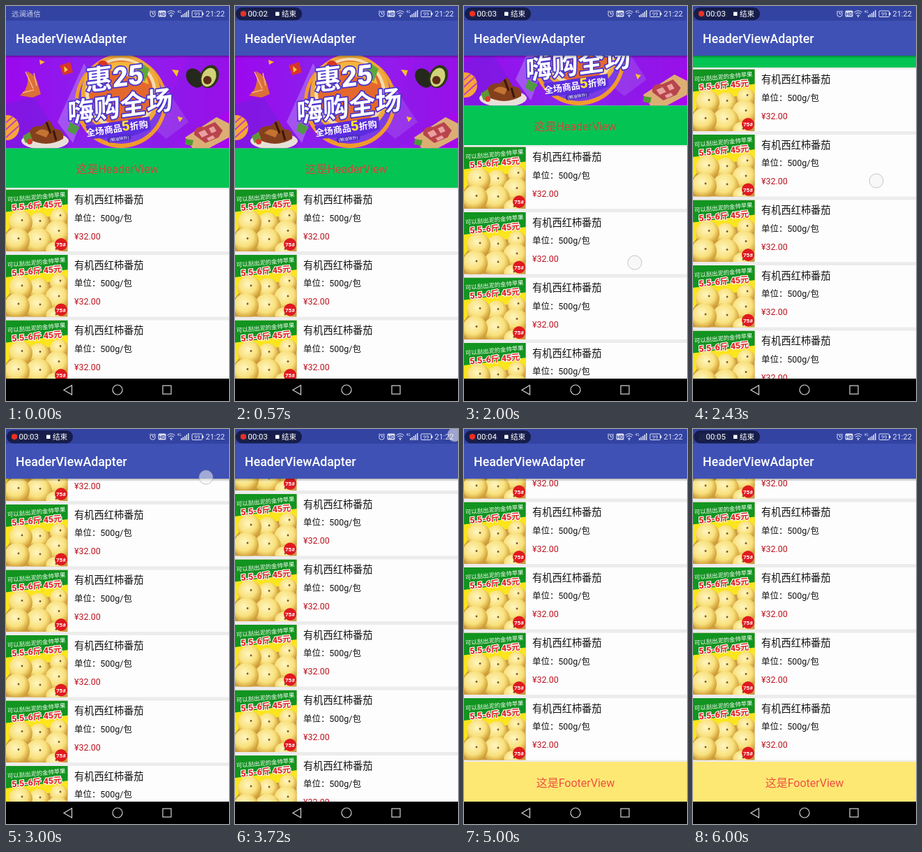
An HTML page that plays this animation: 320 by 565 pixels, repeating every 6.14 s.

```html
<!DOCTYPE html>
<html lang="zh-CN">
<head>
<meta charset="utf-8">
<title>HeaderViewAdapter</title>
<style>
html, body { margin: 0; width: 100%; height: 100%; overflow: hidden; background: #000; }
svg { display: block; width: 100%; height: 100%; font-family: Roboto, "Noto Sans CJK SC", "Noto Sans CJK", sans-serif; }
.mid { text-anchor: middle; }
.promo { text-anchor: middle; font-weight: 800; fill: #fff; stroke: #4a34cc; stroke-width: 3.5; stroke-linejoin: round; paint-order: stroke; }
.line { fill: none; stroke: #d4d4d4; stroke-width: 1.2; }
.thin { fill: none; stroke: #dfe3f5; stroke-width: 1; }
</style>
</head>
<body>
<svg viewBox="0 0 320 565" lang="zh-CN">
  <defs>
    <clipPath id="view"><rect y="71" width="320" height="462"/></clipPath>
    <clipPath id="bannerBox"><rect y="71" width="320" height="132.5"/></clipPath>
    <clipPath id="photoBox"><rect width="88.5" height="88.5"/></clipPath>
    <linearGradient id="violet">
      <stop offset="0" stop-color="#9c08ee"/><stop offset=".5" stop-color="#8428ec"/><stop offset="1" stop-color="#a806ee"/>
    </linearGradient>
    <linearGradient id="shade" x2="0" y2="1">
      <stop offset="0" stop-color="#000" stop-opacity=".3"/><stop offset="1" stop-color="#000" stop-opacity="0"/>
    </linearGradient>
    <radialGradient id="apple" cx=".42" cy=".36" r=".62">
      <stop offset="0" stop-color="#fff6c0"/><stop offset=".6" stop-color="#f8e07c"/><stop offset="1" stop-color="#cf9c34"/>
    </radialGradient>
    <g id="photo" clip-path="url(#photoBox)">
      <rect width="89" height="89" fill="#c99a45"/>
      <path d="M0 28L89 16V36L50 40 12 46 0 62Z" fill="#fbe51c"/>
      <g id="apples" fill="url(#apple)"></g>
      <path d="M0 0H89V21L0 32Z" fill="#129420"/>
      <circle cx="79" cy="78.500" r="9" fill="#e01a20"/>
    </g>
  </defs>

  <rect width="320" height="565" fill="#ececec"/>
  <g clip-path="url(#view)">
    <g id="list">
      <g clip-path="url(#bannerBox)">
        <rect y="71" width="320" height="133" fill="url(#violet)"/>
        <path d="M0 140L40 130 90 204H0Z" fill="#7a1ce0" opacity=".7"/>
        <path d="M74 166L112 82 128 110 96 196ZM212 90L262 166 230 190 206 170Z" fill="#b98cf4" opacity=".5"/>
        <path d="M262 71H320V150L232 204H205Z" fill="#8a1ae6" opacity=".5"/>
        <circle cx="165" cy="137" r="66" fill="#f29a2c"/>
        <circle cx="165" cy="136" r="61" fill="#7a3ce4"/>
        <circle cx="165" cy="126" r="57" fill="#f0a83c"/>
        <circle cx="165" cy="125" r="51" fill="#f4dcae"/>
        <circle cx="165" cy="124" r="46" fill="#e4682c"/>
        <path d="M125 100Q150 68 196 86L205 112 150 92Z" fill="#f5b53c"/>
        <path d="M192 80l14 10-7 18-12-12z" fill="#5fa83a"/>
        <circle cx="139" cy="86" r="8" fill="#d63524"/>
        <path d="M114 172L206 158 208 176 182 186 122 190Z" fill="#5c2ce0"/>
        <path d="M92 166l14 8-8 10-10-6zM222 146l14-4-4 12z" fill="#4f9a42"/>

        <path d="M30 93Q44 100 46 112L50 126 38 131 20 128 27 121Q34 108 30 93Z" fill="#dc7038"/>
        <path d="M28 94L39 118M40 96L44 114M24 124L40 120" fill="none" stroke="#f6b488" stroke-width="1.500"/>
        <path d="M77 85l15-5 4 15-14 4z" fill="#d8342c"/>
        <path d="M83 86l6 5-5 4z" fill="#f8ca3c"/>
        <path d="M48 77l8 3-7 4z" fill="#f5b92c"/>
        <circle cx="1" cy="174" r="18" fill="#f4a63a"/>
        <path d="M-6 172L10 158M-6 182L16 162M0 188L19 171" stroke="#c23fc0" stroke-width="2"/>
        <ellipse cx="56" cy="193" rx="34" ry="12" fill="#e8e0d8"/>
        <path d="M32 190Q32 170 50 172L62 163 70 176Q84 176 82 190 58 204 32 190Z" fill="#84401c"/>
        <path d="M42 182Q50 172 62 180L58 188Z" fill="#c47432"/>
        <path d="M68 178L72 192M58 166L64 182" stroke="#38180c" stroke-width="3"/>
        <path d="M24 186l10-6 4 12-10 4z" fill="#5f9638"/>
        <circle cx="34" cy="194" r="4" fill="#d83c2c"/>

        <ellipse cx="271" cy="103" rx="11" ry="15" transform="rotate(-38 271 103)" fill="#25281c"/>
        <ellipse cx="292" cy="101" rx="13" ry="17" transform="rotate(22 292 101)" fill="#2c3818"/>
        <ellipse cx="291" cy="102" rx="10" ry="14" transform="rotate(22 291 102)" fill="#d2d278"/>
        <circle cx="289" cy="106" r="6" fill="#5c2e18"/>
        <path d="M257 188L302 159 320 168V188L290 204H268Z" fill="#dcae74"/>
        <path d="M270 184Q270 171 284 173L300 166 311 178 305 188 286 196Z" fill="#b8444c"/>
        <path d="M276 181l9-4 5 7-9 4zM291 175l7-3 4 7-7 3zM288 189l9-4 3 4-9 4z" fill="#eaa0a0"/>
        <path d="M258 190l11 2-2 8-10-2z" fill="#4f9a35"/>
        <path d="M238 91l10 1-3 9zM246 158l8 2-5 6z" fill="#f5c42c"/>

        <text class="promo" font-size="39" transform="translate(156 116) rotate(-7) skewX(-6)">惠25</text>
        <text class="promo" font-size="38" transform="translate(164 157) rotate(-7.500) skewX(-6)">嗨购全场</text>
        <g transform="translate(160 180) rotate(-8.500)">
          <text class="mid" font-size="13" font-weight="700" fill="#fff">全场商品<tspan font-size="20" font-weight="900" fill="#ffe22c">5</tspan>折购</text>
          <rect x="-16" y="6" width="34" height="8" rx="4" fill="#4a28c0"/>
          <text class="mid" x="1" y="12.300" font-size="6" fill="#fff">(粮油除外)</text>
        </g>
      </g>
      <rect y="203.500" width="320" height="56.500" fill="#04c454"/>
      <text class="mid" x="159.500" y="238.500" font-size="16" fill="#d0483c">这是HeaderView</text>
      <g id="rows"></g>
      <rect y="1195" width="320" height="58" fill="#fde874"/>
      <text class="mid" x="160" y="1230.500" font-size="16" fill="#ee5040">这是FooterView</text>
    </g>
    <ellipse id="glow" cx="160" cy="533" rx="420" ry="28" fill="#3f51b5"/>
    <rect y="71" width="320" height="4" fill="url(#shade)"/>
  </g>

  <rect width="320" height="21" fill="#3343a2"/>
  <rect y="21" width="320" height="50" fill="#3f51b5"/>
  <text x="14" y="53" font-size="17.780" font-weight="500" fill="#fff">HeaderViewAdapter</text>

  <g fill="#dfe3f5">
    <text x="8" y="14.800" font-size="10.400" fill="#c2c9ea">远澜通信</text>
    <g class="thin"><circle cx="210.500" cy="11.500" r="3.800"/><path d="M210.500 9V11.500H212.500M206 8.500L208 6.500M215 8.500L213 6.500"/></g>
    <rect x="218.500" y="6.500" width="11" height="9" rx="1.500"/>
    <text class="mid" x="224" y="13.700" font-size="7" font-weight="700" fill="#3343a2">HD</text>
    <path class="thin" d="M231.500 9Q237 4.500 242.500 9M233 11.500Q237 8 241 11.500M235 13.700Q237 12 239 13.700"/>
    <circle cx="237" cy="15" r="1"/>
    <text x="245.500" y="9.500" font-size="5">4G</text>
    <path d="M251 13h1.500v3H251zM253.500 11.500h1.500v4.500h-1.500zM256 10h1.500v6H256zM258.500 8h1.500v8h-1.500zM261 6h1.500v10H261z"/>
    <rect class="thin" x="267" y="7" width="14.500" height="8.500" rx="1"/>
    <rect x="282" y="9.500" width="1.500" height="3.500"/>
    <text class="mid" x="274.300" y="14" font-size="7.500">99</text>
    <text x="286.500" y="15" font-size="11">21:22</text>
  </g>

  <g id="badge" fill="#fff">
    <rect x="1" y="2" width="95" height="18.500" rx="9" fill="#12183c" opacity=".86"/>
    <path id="dot" d="M12 6.500l4 2.200v4.600l-4 2.200-4-2.200V8.700z" fill="#ee3024"/>
    <text id="clock" x="18.500" y="15" font-size="11.400"></text>
    <rect x="58" y="8.500" width="5.500" height="5.500"/>
    <text x="67" y="15" font-size="10.600">结束</text>
  </g>

  <rect y="533" width="320" height="32" fill="#000"/>
  <path class="line" d="M94.500 542.500V556L83 549.200Z"/>
  <circle class="line" cx="160" cy="549" r="7"/>
  <rect class="line" x="225" y="543" width="12" height="12"/>

  <circle id="touch" r="10" fill="#f4f4f4" fill-opacity=".55" stroke="#999" stroke-opacity=".55"/>
</svg>
<script>
const LOOP = 6140, ROWS = 10, PITCH = 93.5;
const $ = id => document.getElementById(id);

// Apples: x, y, radius
$('apples').innerHTML = [[76, 40, 13], [47, 48, 15], [21, 47, 17], [74, 62, 18],
  [47, 74, 19], [16, 73, 18], [70, 88, 13]].map(([x, y, r]) =>
  `<circle cx="${x}" cy="${y}" r="${r}"/><circle cx="${x + 2}" cy="${y - 3}" r="1.4" fill="#7d5a2c"/>`).join('');

const row = y => `<g transform="translate(0 ${y})">
  <rect width="320" height="88.5" fill="#fdfdfd"/>
  <use href="#photo"/>
  <g class="mid" transform="rotate(-5 44 20)">
    <text x="44.500" y="13.800" font-size="8.400" font-weight="500" fill="#fff">可以刮出泥的金帅苹果</text>
    <text x="44" y="27.300" font-size="12.200" font-weight="800" fill="#e0201c" stroke="#fff" stroke-width="2.200" paint-order="stroke">5.5-6斤 45元</text>
  </g>
  <text class="mid" x="79" y="81.500" font-size="8" font-weight="700" fill="#fff">75#</text>
  <text x="98" y="19.500" font-size="14.220" fill="#111">有机西红柿番茄</text>
  <text x="98" y="45.300" font-size="12.440" fill="#111">单位：500g/包</text>
  <text x="98" y="71" font-size="12.440" fill="#bb1420">¥32.00</text>
</g>`;
$('rows').innerHTML = Array.from({length: ROWS}, (_, i) => row(262.5 + i * PITCH)).join('');

// Tracks of [tick, value]
const scroll = [[11, 0], [12, 14], [14, 61], [17, 172], [21, 341.5], [24, 398], [26, 450], [28, 612], [29.5, 719]];
const touchX = [[10, 240], [14, 245], [21, 287], [26, 315]];
const touchY = [[10, 434], [11, 430], [14, 367], [17, 250], [21, 69], [26, 8]];
const glow = [[28, 0], [30, 28], [31, 25], [34, 0]];

function at(track, k) {
  if (k <= track[0][0]) return track[0][1];
  for (let i = 1; i < track.length; i++) {
    const [a, u] = track[i - 1], [b, v] = track[i];
    if (k <= b) return u + (v - u) * (k - a) / (b - a);
  }
  return track[track.length - 1][1];
}

const show = (id, on) => $(id).style.display = on ? '' : 'none';

function draw() {
  const k = Math.floor(Math.floor(performance.now() % LOOP / 10) * 7 / 100);
  $('list').setAttribute('transform', `translate(0 ${-at(scroll, k)})`);

  show('touch', k >= 10 && k <= 26);
  $('touch').setAttribute('cx', at(touchX, k));
  $('touch').setAttribute('cy', at(touchY, k));

  const g = at(glow, k);
  $('glow').setAttribute('ry', g);
  $('glow').setAttribute('opacity', g / 28 * .28);

  const sec = k < 8 ? 2 : k < 27 ? 3 : k < 40 ? 4 : 5;
  show('badge', k > 0);
  show('dot', !(k >= 8 && k < 12 || k >= 40));
  $('clock').textContent = '00:0' + sec;
  requestAnimationFrame(draw);
}
draw();
</script>
</body>
</html>
```
